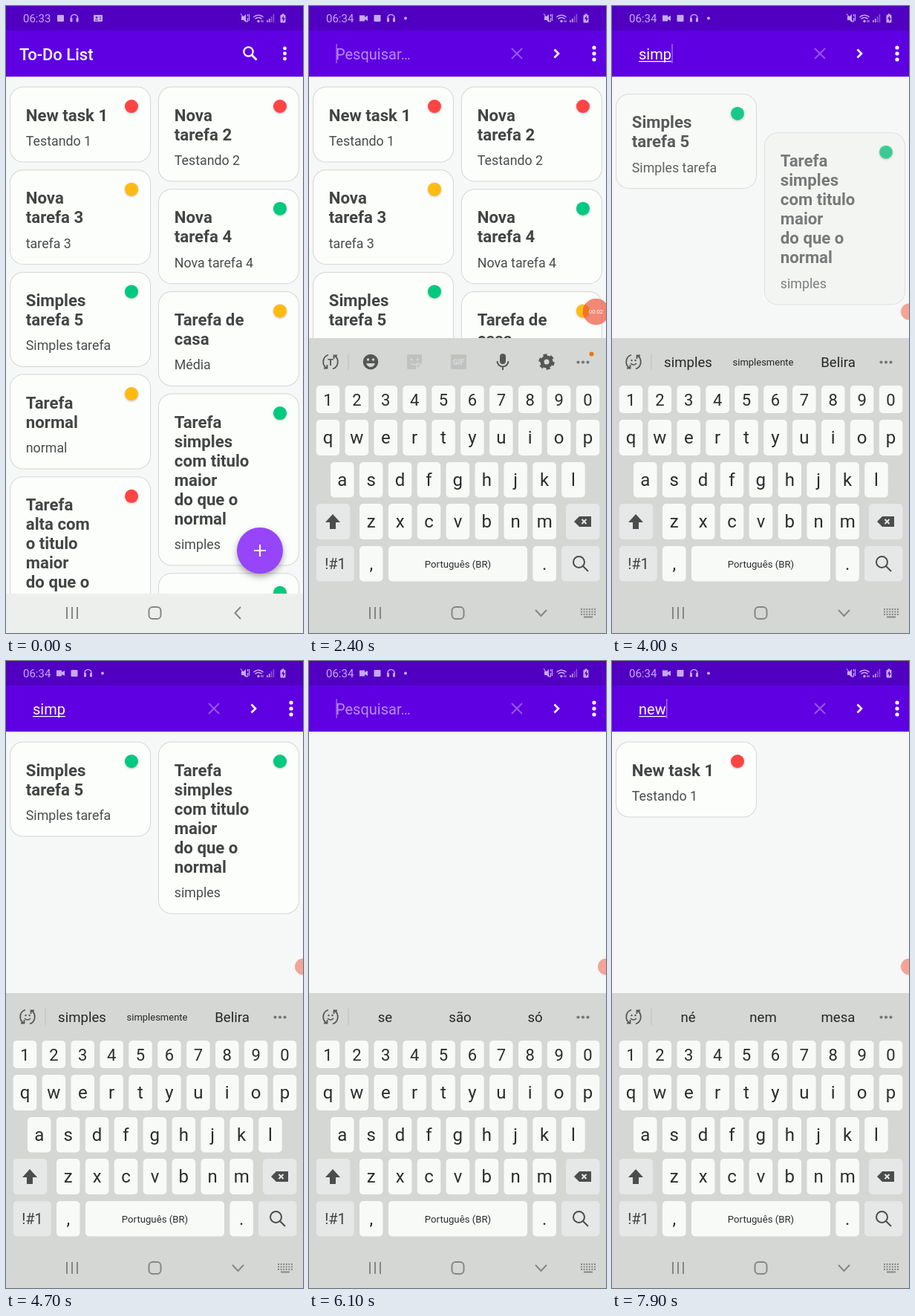
Animation of 400 by 844 pixels, one loop 8000 ms. Source, as an HTML page with a canvas:

```html
<!DOCTYPE html>
<html lang="pt-BR">
<head>
<meta charset="utf-8">
<title>To-Do List</title>
<style>
  html, body { margin: 0; width: 100%; height: 100%; overflow: hidden; background: #f6f7f7; }
  canvas { display: block; width: 400px; height: 844px; }
</style>
</head>
<body>
<canvas id="stage"></canvas>
<script>
const LOOP = 8000, W = 400, H = 844;
const canvas = document.getElementById('stage');
const ctx = canvas.getContext('2d');
const dpr = window.devicePixelRatio || 1;
canvas.width = W * dpr;
canvas.height = H * dpr;

const RED = '#ff4444', AMBER = '#ffbb10', GREEN = '#00c980';
const STATUS = '#c6aaee', DARK = '#555756', FADED = '#bfc2c0';
const TASKS = [
  ['New task 1', 'Testando 1', RED],
  ['Nova\ntarefa 2', 'Testando 2', RED],
  ['Nova\ntarefa 3', 'tarefa 3', AMBER],
  ['Nova\ntarefa 4', 'Nova tarefa 4', GREEN],
  ['Simples\ntarefa 5', 'Simples tarefa', GREEN],
  ['Tarefa de\ncasa', 'Média', AMBER],
  ['Tarefa\nnormal', 'normal', AMBER],
  ['Tarefa\nsimples\ncom titulo\nmaior\ndo que o\nnormal', 'simples', GREEN],
  ['Tarefa\nalta com\no titulo\nmaior\ndo que o\nnormal', 'alta', RED],
  ['Tarefa\nextra', 'extra', GREEN],
].map(([title, note, color]) => ({ lines: title.split('\n'), note, color }));

// Each edit: when the text changes, when the list reloads, delay between cards.
const EDITS = [
  { at: -1e4, text: '', reload: -1e4, stagger: 0 },
  { at: 2650, text: 's', reload: 2750, stagger: 75 },
  { at: 2950, text: 'si', reload: 3050, stagger: 75 },
  { at: 3250, text: 'sim', reload: 3330, stagger: 75 },
  { at: 3480, text: 'simp', reload: 3560, stagger: 90 },
  { at: 5040, text: 'sim', reload: 5047, stagger: 17 },
  { at: 5450, text: 'si', reload: 5560, stagger: 75 },
  { at: 5750, text: 's', reload: 5850, stagger: 75 },
  { at: 5980, text: '', reload: 6060, stagger: 55 },
  { at: 6870, text: 'n', reload: 6950, stagger: 75 },
  { at: 7250, text: 'ne', reload: 7330, stagger: 75 },
  { at: 7820, text: 'new', reload: LOOP, stagger: 75 },
];
const SUGGESTIONS = {
  s: ['se', 'são', 'só'],
  si: ['simples', 'simplesmente', 'som'],
  sim: ['simples', 'simplesmente', 'som'],
  simp: ['simples', 'simplesmente', 'Belira'],
  n: ['não', 'na', 'no'],
  ne: ['né', 'nem', 'mesa'],
  new: ['né', 'nem', 'mesa'],
};

const clamp = v => Math.max(0, Math.min(1, v));
const progress = (t, from, to) => clamp((t - from) / (to - from));
const easeOut = u => 1 - (1 - u) ** 2;
const mix = (a, b, u) => a + (b - a) * u;
const lastBefore = (key, t) => EDITS.filter(e => e[key] <= t).pop();

function text(s, x, y, size, color, weight = 400, align = 'left') {
  ctx.font = `${weight} ${size}px Roboto, sans-serif`;
  ctx.textAlign = align;
  ctx.fillStyle = color;
  ctx.fillText(s, x, y);
}
function rect(x, y, w, h, color, r = 0) {
  ctx.beginPath();
  ctx.roundRect(x, y, w, h, r);
  ctx.fillStyle = color;
  ctx.fill();
}
function circle(x, y, r, color) {
  ctx.beginPath();
  ctx.arc(x, y, r, 0, 7);
  ctx.fillStyle = color;
  ctx.fill();
}
function stroke(d, color, width = 2, dash = []) {
  ctx.strokeStyle = color;
  ctx.lineWidth = width;
  ctx.setLineDash(dash);
  ctx.stroke(new Path2D(d));
  ctx.setLineDash([]);
}
function fill(d, color) {
  ctx.fillStyle = color;
  ctx.fill(new Path2D(d));
}
function at(x, y, paint) {
  ctx.save();
  ctx.translate(x, y);
  paint();
  ctx.restore();
}
function shadow(color, blur, dy) {
  ctx.shadowColor = color;
  ctx.shadowBlur = blur * dpr;
  ctx.shadowOffsetY = dy * dpr;
}
function dots(x, y, gap, r, color, vertical) {
  for (const k of [-1, 0, 1]) circle(x + (vertical ? 0 : k * gap), y + (vertical ? k * gap : 0), r, color);
}

function drawCard(task, x, y, height) {
  rect(x, y, 190, height, '#d4d7d6', 18);
  rect(x + 1, y + 1, 188, height - 2, '#fcfefc', 17);
  task.lines.forEach((line, i) => text(line, x + 21.8, y + 46 + i * 26, 22.2, '#434444', 700));
  text(task.note, x + 21.8, y + 53.5 + task.lines.length * 26, 17.8, '#4a4b4b');
  at(x + 164, y + 26.5, () => {
    shadow('rgba(0,0,0,.25)', 3, 1);
    circle(0, 0, 9, task.color);
  });
}

function drawList(t) {
  const { text: query, reload, stagger } = lastBefore('reload', t);
  const bottoms = [108.5, 108.5];
  TASKS.filter(task => task.lines.join(' ').toLowerCase().includes(query)).forEach((task, i) => {
    const column = bottoms[0] <= bottoms[1] ? 0 : 1;
    const height = 76 + task.lines.length * 26;
    const start = reload + i * stagger;
    const u = progress(t, start, start + 500);
    ctx.globalAlpha = u;
    if (u > 0) drawCard(task, 5 + column * 200, bottoms[column] + 695 * (1 - u) ** 2, height);
    bottoms[column] += height + 9.7;
  });
  ctx.globalAlpha = 1;
  at(342, 733, () => {
    ctx.save();
    shadow('rgba(0,0,0,.35)', 8, 4);
    circle(0, 0, 31, '#9645f8');
    ctx.restore();
    stroke('M-8 0H8M0 -8V8', '#fff', 2.2);
  });
}

function drawStatusBar(recording) {
  rect(0, 0, W, 33, '#5100c2');
  text(recording ? '06:34' : '06:33', 23, 22, 15, STATUS);
  const shift = recording ? 18.5 : 0;
  rect(69 + shift, 12, 9, 9, STATUS, 1);
  at(92 + shift, 16, () => {
    stroke('M-4.5 3V0A4.5 4.5 0 0 1 4.5 0V3', STATUS, 1.5);
    rect(-5.5, 0, 3, 5.5, STATUS, 1);
    rect(2.5, 0, 3, 5.5, STATUS, 1);
  });
  if (recording) {
    fill('M68 12.5h7v2.5l4 -2v7l-4 -2v2.5h-7z', STATUS);
    circle(130, 16.5, 2, STATUS);
  } else {
    rect(118, 12, 12, 9, STATUS, 1);
    circle(122, 15.5, 1.3, '#5100c2');
    stroke('M120 19H124M126 15H128M126 18H128', '#5100c2', 1);
  }
  fill('M317 14h3l3 -3v11l-3 -3h-3z', STATUS);
  stroke('M316 10.5L325 22M325.500 11v3M325.500 16v5M327.500 11v9', STATUS, 1.2);
  at(340, 21, () => {
    stroke('M-6.500 -6A9 9 0 0 1 6.500 -6M-4.500 -3.500A6 6 0 0 1 4.500 -3.500', STATUS, 1.5);
    circle(0, -.5, 1.7, STATUS);
    stroke('M4 -2v3M6 -2v3', STATUS, 1);
  });
  stroke('M352 22v-3M354.800 22v-5', STATUS, 1.6);
  stroke('M357.600 22v-8M360.400 22v-11', '#8755d6', 1.6);
  rect(369.5, 12, 7, 10.5, STATUS, 1);
  rect(371.5, 10.5, 3, 2, STATUS);
  fill('M374 13l-3 4.500h2v3.500l3 -4.500h-2z', '#5100c2');
}

function drawAppBar(t) {
  rect(0, 33, W, 62, '#5e00e2');
  rect(0, 95, W, 1, 'rgba(80,60,120,.12)');
  if (t < 1300) {
    if (t >= 1200) circle(329, 64, 22, 'rgba(255,255,255,.2)');
    text('To-Do List', 18, 73, 22, '#fff', 500);
    ctx.beginPath();
    ctx.arc(326.5, 61.5, 6.2, 0, 7);
    ctx.strokeStyle = '#fff';
    ctx.lineWidth = 2.2;
    ctx.stroke();
    stroke('M331 66L337.500 72.500', '#fff', 2.8);
    dots(375.5, 64, 7, 2.4, '#fff', true);
    return;
  }
  const query = lastBefore('at', t).text;
  text(query || 'Pesquisar…', 36, 71.5, 20, query ? '#fff' : '#b98bf2');
  const width = query ? ctx.measureText(query).width : 0;
  if (query) rect(36, 74, width, 1.2, '#fff');
  if (t < 4700 || t >= 5040) rect(36.5 + width, 51, 1.2, 26, '#ad7ff0');
  stroke('M273 57L287 71M287 57L273 71', '#9856ee', 2);
  stroke('M330.500 58.500L336 64L330.500 69.500', '#fff', 2.6);
  dots(384, 64, 8, 2.6, '#fff', true);
}

function drawCycleIcon() {
  stroke('M-3 -9.500A10 10 0 0 0 -5 8.500M3 9.500A10 10 0 0 0 5 -8.500', DARK, 1.8);
  stroke('M-9 8.500H-4.500V4M9 -8.500H4.500V-4', DARK, 1.8);
}

function drawKeyboardTools(t) {
  const words = SUGGESTIONS[lastBefore('at', t - 150).text];
  at(29, 479, () => {
    drawCycleIcon();
    if (words) {
      circle(-2.5, -2, 1.2, DARK);
      circle(2.5, -2, 1.2, DARK);
      stroke('M-4 2Q0 6 4 2', DARK, 1.5);
    } else text('T', 0, 5, 13, DARK, 700, 'center');
  });
  rect(52.5, 468, 1, 22, '#bcbfbd');
  dots(369, 479.5, 6.5, 2.1, '#747674');
  if (words) {
    words.forEach((word, i) => {
      const size = word.length > 10 ? 13 : 18.6;
      text(word, 102.5 + i * 101, size > 15 ? 486 : 484, size, '#252626', 400, 'center');
    });
    return;
  }
  circle(380.5, 468.5, 3, '#f0730f');
  at(83, 479, () => {
    circle(0, 0, 10.3, DARK);
    circle(-3.5, -3, 1.7, '#d5d7d4');
    circle(3.5, -3, 1.7, '#d5d7d4');
    fill('M-6 2H6Q4 7 0 7T-6 2', '#d5d7d4');
  });
  at(142, 479, () => {
    fill('M-8 -10H8Q10 -10 10 -8V2L2 10H-8Q-10 10 -10 8V-8Q-10 -10 -8 -10', FADED);
    circle(-4, -3, 1.5, '#d5d7d4');
    circle(4, -3, 1.5, '#d5d7d4');
    stroke('M-5 2Q0 6 5 1M3 9V3H9', '#d5d7d4', 1.5);
  });
  rect(191, 469, 21, 20, FADED, 2);
  text('GIF', 201.5, 483, 10, '#d9dbd8', 700, 'center');
  at(261, 479, () => {
    rect(-4, -11, 8, 14, DARK, 4);
    stroke('M-7.500 -1A7.500 7.500 0 0 0 7.500 -1M0 6V11', DARK, 2);
  });
  at(320, 479, () => {
    const ring = r => `M${r} 0A${r} ${r} 0 1 1 ${-r} 0A${r} ${r} 0 1 1 ${r} 0`;
    stroke(ring(6), DARK, 5);
    stroke(ring(9), DARK, 3.4, [5, 4.42]);
  });
}

function drawKeys(t) {
  const next = EDITS.findIndex(e => t >= e.at - 90 && t < e.at);
  const grows = next > 0 && EDITS[next].text.length > EDITS[next - 1].text.length;
  const pressed = next < 0 ? null : grows ? EDITS[next].text.slice(-1) : 'back';
  const key = (id, x, y, w, h, special) =>
    rect(x, y, w, h, pressed === id ? '#c9cccb' : special ? '#e5e8e7' : '#f8faf8', 5);
  const row = (chars, x, y, h, size, baseline) => [...chars].forEach((c, i) => {
    const left = x + i * 38.9;
    key(c, left, y, 31.5, h);
    text(c, left + 15.75, y + baseline, size, '#2b2c2c', 400, 'center');
  });
  row('1234567890', 9.7, 511, 37, 22, 26.5);
  row('qwertyuiop', 9.7, 557, 48, 24, 31.5);
  row('asdfghjkl', 29, 614, 47.5, 24, 31.5);
  row('zxcvbnm', 68, 670, 48, 24, 31.5);
  row(',', 68, 727, 47.5, 24, 31.5);
  row('.', 301.4, 727, 47.5, 24, 31.5);

  key('shift', 9.7, 670, 45.5, 48, true);
  fill('M32 684L42 695H36V704H28V695H22Z', '#4b4d4c');
  key('back', 346, 670, 45.5, 48, true);
  fill('M357 694L364 687H380V701H364Z', '#4b4d4c');
  stroke('M367.500 691L373.500 697M373.500 691L367.500 697', '#e5e8e7', 2);
  key('symbols', 9.7, 727, 51, 47.5, true);
  text('!#1', 35.5, 758, 20, '#3f4140', 400, 'center');
  key('space', 107, 727, 187, 47.5);
  text('Português (BR)', 200.5, 755.5, 13.2, '#2b2c2c', 400, 'center');
  key('search', 340, 727, 51.5, 47.5, true);
  stroke('M371 748.500A7.500 7.500 0 1 1 356 748.500A7.500 7.500 0 1 1 371 748.500M369 754L376 761', '#4b4d4c', 2);
}

function drawNavigation(searching) {
  const gray = '#858786';
  stroke('M82 809V825M89 809V825M96 809V825', gray, 2);
  ctx.beginPath();
  ctx.roundRect(192.5, 809, 16, 16, 5);
  ctx.strokeStyle = gray;
  ctx.lineWidth = 2;
  ctx.stroke();
  if (!searching) {
    stroke('M316 809L308.500 817L316 825', gray, 2);
    return;
  }
  stroke('M305 813L312.500 821L320 813', gray, 2);
  for (const y of [812, 815.5, 819]) stroke(`M366 ${y}H386`, gray, 2, [2, 1.6]);
  stroke('M370 822.500H382', gray, 2);
}

function drawBubble(t) {
  if (t < 100) return;
  const enter = easeOut(progress(t, 100, 500));
  const shrink = easeOut(progress(t, 1950, 2200));
  const dock = easeOut(progress(t, 2550, 2950));
  const x = mix(mix(mix(424, 378, enter), 386.5, shrink), 400, dock);
  const scale = mix(mix(1, .81, shrink), .5, dock);
  at(x, 411.5, () => {
    ctx.scale(scale, scale);
    ctx.globalAlpha = mix(mix(enter, .68, shrink), .5, dock);
    circle(0, 0, 22, '#ed5236');
    ctx.globalAlpha = 1 - dock;
    text('00:0' + Math.min(2, Math.floor(t / 1000)), 0, 3.5, 9.6, '#fff', 400, 'center');
  });
}

function draw(t) {
  ctx.setTransform(dpr, 0, 0, dpr, 0, 0);
  rect(0, 0, W, H, '#f6f7f7');
  drawList(t);
  drawAppBar(t);
  drawStatusBar(t >= 100);
  rect(0, 791, W, 53, '#edefed');
  const rise = easeOut(progress(t, 1430, 1700));
  if (rise > 0) at(0, 397 * (1 - rise), () => {
    rect(0, 447, W, 397, '#d5d7d4');
    drawKeyboardTools(t);
    drawKeys(t);
  });
  if (rise > 0 && rise < 1) rect(0, 791, W, 53, '#d5d7d4');
  drawNavigation(t >= 1300);
  drawBubble(t);
}

const start = performance.now();
function frame() {
  draw((performance.now() - start) % LOOP);
  requestAnimationFrame(frame);
}
frame();
</script>
</body>
</html>
```
